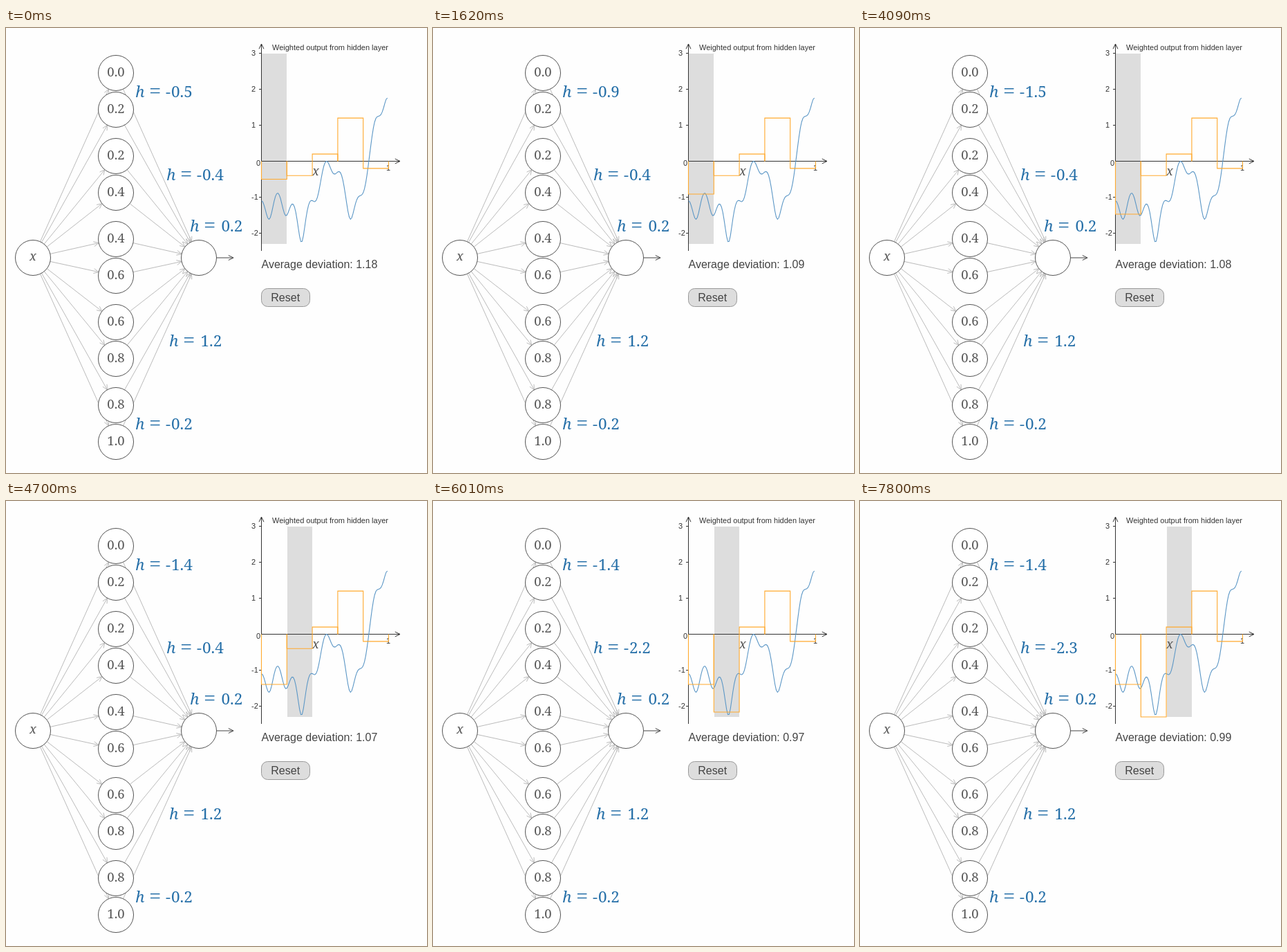
Recreate the animation shown at these times as an HTML page with a canvas. Size 609x643 px, loop 8 s.

```html
<!DOCTYPE html>
<html lang="en">
<head>
<meta charset="utf-8">
<title>Step function builder</title>
<style>
html, body { margin: 0; width: 100%; height: 100%; overflow: hidden; background: #fefefe; }
canvas { display: block; }
</style>
</head>
<body>
<canvas id="stage" width="609" height="643"></canvas>
<script>
const ctx = document.getElementById('stage').getContext('2d');
const LOOP = 8000, TICK = 75;
const SANS = '"Liberation Sans", Arial, sans-serif';
const SERIF = '"Noto Serif", "Liberation Serif", serif';
const BLUE = '#256fa8', INK = '#333', GREY = '#555';

// Plot coordinates
const X0 = 369.5, Y0 = 192.5, UNIT = 52, WIDTH = 184;
const px = x => X0 + x * WIDTH;
const py = v => Y0 - v * UNIT;

// Pointer drags of the first two bars: [start, end, final y]
const DRAG_1 = [[930, 930, 222], [1080, 1850, 247], [1930, 2390, 266], [2540, 2770, 269],
  [3170, 3480, 263], [3940, 4090, 269], [4320, 4470, 265]];
const DRAG_2 = [[5250, 6010, 305], [6410, 6790, 308], [7190, 7340, 312]];

// Mean deviation of the three bars that never move
const REST = .7969;

function dragY(t, y, drags) {
  for (const [start, end, to] of drags) {
    if (t < start) break;
    const steps = ms => Math.floor((ms - start) / TICK) + 1;
    y = Math.round(y + (to - y) * steps(Math.min(t, end)) / steps(end));
  }
  return y;
}

// Inverse sigmoid of the goal function
function goal(x) {
  const f = .2 + .4 * x * x + .3 * x * Math.sin(15 * x) + .05 * Math.cos(50 * x);
  return Math.log(f / (1 - f));
}

// Share of one bar in the average distance to the curve
function deviation(bar, h) {
  let sum = 0;
  for (let i = 0; i < 10; i++) sum += Math.abs(goal(bar / 5 + .01 + i * .02) - h);
  return sum / 50;
}

function path(pts, color, width = 1) {
  ctx.beginPath();
  pts.forEach(([x, y]) => ctx.lineTo(x, y));
  ctx.strokeStyle = color;
  ctx.lineWidth = width;
  ctx.stroke();
}

function text(str, x, y, font, color, align = 'left') {
  ctx.font = font;
  ctx.textAlign = align;
  ctx.fillStyle = color;
  ctx.fillText(str, x, y);
}

function arrow(xa, ya, xb, yb, color, size = 8) {
  const a = Math.atan2(yb - ya, xb - xa);
  const wing = d => [xb - size * Math.cos(a + d), yb - size * Math.sin(a + d)];
  path([[xa, ya], [xb, yb]], color);
  path([wing(.45), [xb, yb], wing(-.45)], color);
}

function edge(xa, ya, xb, yb) {
  const k = 1 - 25.5 / Math.hypot(xb - xa, yb - ya);
  arrow(xa, ya, xa + (xb - xa) * k, ya + (yb - ya) * k, '#bbb');
}

function circle(x, y) {
  ctx.beginPath();
  ctx.arc(x, y, 25.5, 0, Math.PI * 2);
  ctx.fillStyle = '#fff';
  ctx.fill();
  ctx.strokeStyle = GREY;
  ctx.lineWidth = 1;
  ctx.stroke();
}

function weightLabel(x, y, h) {
  const font = `22.5px ${SERIF}`;
  text('h', x, y, 'italic ' + font, BLUE);
  text('=', x + 20.5, y + 1, '29px "Liberation Serif", serif', BLUE);
  if (h < 0) text('-', x + 44, y, font, BLUE);
  text(Math.abs(h).toFixed(1), x + (h < 0 ? 52 : 45.5), y, font, BLUE);
}

function drawNetwork(heights) {
  const nodes = [];
  for (let i = 0; i < 10; i++) {
    const pair = i >> 1, side = i % 2;
    nodes.push({ y: 65 + 120 * pair + 53 * side, label: ((pair + side) / 5).toFixed(1) });
  }
  for (const { y } of nodes) {
    edge(39, 332, 159, y);
    edge(159, y, 279, 332);
  }
  arrow(304.5, 332, 329, 332, '#444');
  for (const { y, label } of nodes) {
    circle(159, y);
    text(label, 159, y + 5, `18.5px ${SERIF}`, GREY, 'center');
  }
  circle(39, 332);
  circle(279, 332);
  text('x', 39, 336, `italic 18px ${SERIF}`, GREY, 'center');

  const labelX = [187, 232, 266, 236, 187], labelY = [100, 220, 294, 460, 580];
  heights.forEach((h, i) => weightLabel(labelX[i], labelY[i], h));
}

function drawPlot(heights, band) {
  const small = `11px ${SANS}`;
  ctx.fillStyle = '#ddd';
  ctx.fillRect(Math.round(px(band / 5) + .5), 37, 36, 275);

  text('Weighted output from hidden layer', 385, 32, small, INK);
  text('x', 448, 213, `italic 18px ${SERIF}`, GREY, 'center');

  arrow(X0, 322, X0, 23, INK);
  arrow(X0, Y0, 570, Y0, INK);
  for (const v of [3, 2, 1, -1, -2]) {
    path([[366, py(v)], [X0, py(v)]], INK);
    text(v, 355, py(v) + 3.5, small, INK);
  }
  text('0', 362, 199, small, INK);
  text('1', 553, 206, small, INK, 'center');

  const curve = [];
  for (let x = 0; x < .995; x += .01) curve.push([px(x), py(goal(x))]);
  path(curve, '#5c97c6', 1.1);

  heights.forEach((h, i) => {
    const a = px(i / 5), b = px((i + 1) / 5), y = py(h);
    path([[a, Y0], [a, y], [b, y], [b, Y0]], '#ffa92e', 1.1);
  });
}

function drawControls(dev) {
  text('Average deviation: ' + dev.toFixed(2), 369.5, 347, `16px ${SANS}`, '#444');
  ctx.beginPath();
  ctx.roundRect(369.5, 376.5, 70, 26, 9);
  ctx.fillStyle = '#ddd';
  ctx.fill();
  ctx.strokeStyle = '#999';
  ctx.lineWidth = 1;
  ctx.stroke();
  text('Reset', 404.2, 395, `16px ${SANS}`, '#444', 'center');
}

function draw(t) {
  const h1 = (Y0 - dragY(t, py(-.5), DRAG_1)) / UNIT;
  const h2 = (Y0 - dragY(t, py(-.4), DRAG_2)) / UNIT;
  const heights = [h1, h2, .2, 1.2, -.2];
  const band = t < 4700 ? 0 : t < 7800 ? 1 : 2;
  ctx.fillStyle = '#fefefe';
  ctx.fillRect(0, 0, 609, 643);
  drawNetwork(heights);
  drawPlot(heights, band);
  drawControls(REST + deviation(0, h1) + deviation(1, h2));
}

const start = performance.now();
function frame() {
  draw((performance.now() - start) % LOOP);
  requestAnimationFrame(frame);
}
frame();
</script>
</body>
</html>
```
